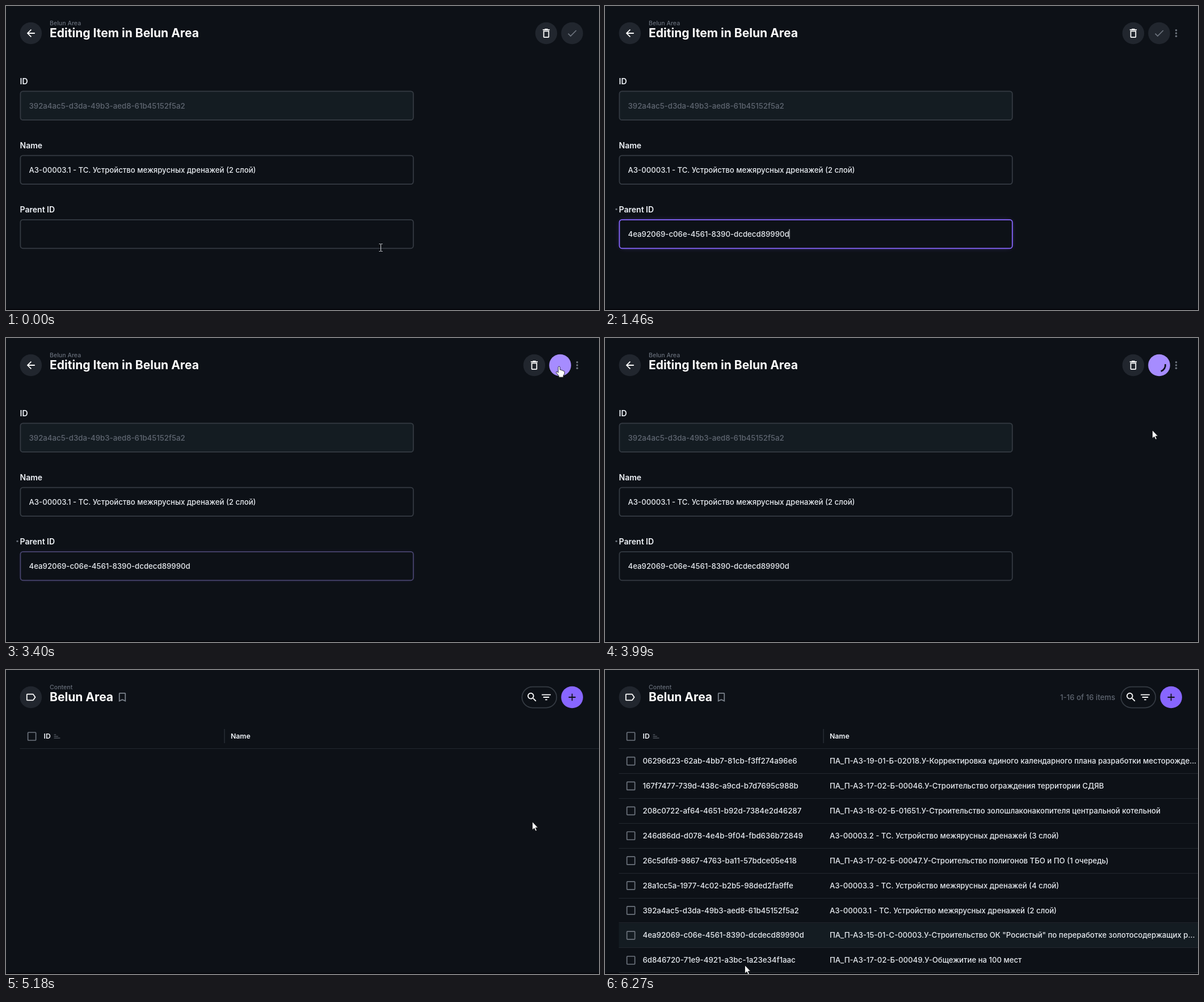
Recreate the animation shown at these times as an HTML page. Size 1045x536 px, loop 6300 ms.

```html
<!DOCTYPE html>
<html lang="en">
<head>
<meta charset="utf-8">
<title>Item editor</title>
<style>
html, body { margin: 0; width: 100%; height: 100%; overflow: hidden; background: #0d1117; }
svg { display: block; width: 1045px; height: 536px; font: 500 13.16px Inter, sans-serif; }
text { white-space: pre; }
.title { font-size: 21.06px; font-weight: 700; fill: #fff; }
.over { font-size: 10.6px; fill: #666d78; }
.label { font-size: 14.04px; font-weight: 600; fill: #f0f4f9; }
.head { font-size: 12.28px; font-weight: 600; fill: #f0f4f9; }
.body { fill: #e8ecf1; }
.id { font-size: 13.24px; }
.dim { fill: #5f6671; }
</style>
</head>
<body>
<svg id="stage" viewBox="0 0 1045 536" xmlns="http://www.w3.org/2000/svg"></svg>
<script>
const LOOP = 6300, SCALE = 0.8775, ROW = 43.9, TOP = 138.6;
const BG = '#0d1117', CHIP = '#21262e', LINE = '#353b43', RULE = '#23282f', SOFT = '#141c22', WHITE = '#fff';
const NAME = 'Belun Area';
const PARENT = '4ea92069-c06e-4561-8390-dcdecd89990d';

const icons = {
  back: 'M20 11H7.83l5.59-5.59L12 4l-8 8 8 8 1.41-1.41L7.83 13H20v-2z',
  bin: 'M6 19c0 1.1.9 2 2 2h8c1.1 0 2-.9 2-2V7H6v12zM8 9h8v10H8V9zm7.5-5l-1-1h-5l-1 1H5v2h14V4h-3.5z',
  check: 'M9 16.17L4.83 12l-1.42 1.41L9 19 21 7l-1.41-1.41L9 16.17z',
  tag: 'M17.63 5.84C17.27 5.33 16.67 5 16 5L5 5.01C3.9 5.01 3 5.9 3 7v10c0 1.1.9 1.99 2 1.99L16 19c.67 0 1.27-.33 1.63-.84L22 12l-4.37-6.16zM16 17H5V7h11l3.55 5L16 17z',
  mark: 'M17 3H7c-1.1 0-1.99.9-1.99 2L5 21l7-3 7 3V5c0-1.1-.9-2-2-2zm0 15l-5-2.18L7 18V5h10v13z',
  search: 'M15.5 14h-.79l-.28-.27C15.41 12.59 16 11.11 16 9.5 16 5.91 13.09 3 9.5 3S3 5.91 3 9.5 5.91 16 9.5 16c1.61 0 3.09-.59 4.23-1.57l.27.28v.79l5 4.99L20.49 19l-4.99-5zm-6 0C7.01 14 5 11.99 5 9.5S7.01 5 9.5 5 14 7.01 14 9.5 11.99 14 9.5 14z',
  filter: 'M10 18h4v-2h-4v2zM3 6v2h18V6H3zm3 7h12v-2H6v2z',
  add: 'M19 13h-6v6h-2v-6H5v-2h6V5h2v6h6v2z',
  sort: 'M3 6h6v2H3zM3 11h12v2H3zM3 16h18v2H3z'
};

const rows = [
  ['06296d23-62ab-4bb7-81cb-f3ff274a96e6', 'ПА_П-АЗ-19-01-Б-02018.У-Корректировка единого календарного плана разработки месторожде...'],
  ['167f7477-739d-438c-a9cd-b7d7695c988b', 'ПА_П-АЗ-17-02-Б-00046.У-Строительство ограждения территории СДЯВ'],
  ['208c0722-af64-4651-b92d-7384e2d46287', 'ПА_П-АЗ-18-02-Б-01651.У-Строительство золошлаконакопителя центральной котельной'],
  ['246d86dd-d078-4e4b-9f04-fbd636b72849', 'АЗ-00003.2 - ТС. Устройство межярусных дренажей (3 слой)'],
  ['26c5dfd9-9867-4763-ba11-57bdce05e418', 'ПА_П-АЗ-17-02-Б-00047.У-Строительство полигонов ТБО и ПО (1 очередь)'],
  ['28a1cc5a-1977-4c02-b2b5-98ded2fa9ffe', 'АЗ-00003.3 - ТС. Устройство межярусных дренажей (4 слой)'],
  ['392a4ac5-d3da-49b3-aed8-61b45152f5a2', 'АЗ-00003.1 - ТС. Устройство межярусных дренажей (2 слой)'],
  [PARENT, 'ПА_П-АЗ-15-01-С-00003.У-Строительство ОК "Росистый" по переработке золотосодержащих р...'],
  ['6d846720-71e9-4921-a3bc-1a23e34f1aac', 'ПА_П-АЗ-17-02-Б-00049.У-Общежитие на 100 мест']
];

// pointer track: time, x, y
const track = [
  [0, 660.5, 426], [30, 660.5, 426], [310, 664, 421.5], [600, 664, 421.5], [830, 690, 550],
  [2449, 690, 550], [2450, 690, 436], [2600, 890, 275], [2680, 905, 238], [2760, 919.5, 210.5],
  [2830, 935, 183], [2960, 968, 80], [3060, 975, 50], [3400, 975, 50], [3520, 990, 68],
  [3620, 999, 98], [3760, 985, 138], [3930, 964.5, 162.5], [4000, 964.5, 162.5], [4250, 951, 200],
  [4570, 927.5, 267.5], [5660, 927.5, 267.5], [6010, 903, 401], [6190, 903, 401],
  [6240, 480, 480], [6270, 246.5, 520.5], [6300, 246.5, 520.5]
];

const svg = (tag, attrs, inner = '') =>
  `<${tag} ${Object.entries(attrs).map(([k, v]) => `${k}="${v}"`).join(' ')}>${inner}</${tag}>`;
const text = (x, y, cls, str) => svg('text', { x, y, class: cls }, str);
const icon = (name, x, y, fill, s = SCALE, id = '') =>
  svg('path', { d: icons[name], fill, id, transform: `translate(${x} ${y}) scale(${s}) translate(-12 -12)` });
const disc = (x, y, fill, r = 19.3, id = '') => svg('circle', { cx: x, cy: y, r, fill, id });
const hline = y => svg('rect', { x: 24.5, y: Math.round(y - 0.5), width: 1020.5, height: 1, fill: RULE });
const box = (y, fill, id = '') => svg('rect', {
  x: 25.4, y: y + 0.9, width: 692.4, height: 50.5, rx: 4.5, fill, stroke: LINE, 'stroke-width': 1.75, id });
const tick = y => svg('rect', {
  x: 38.6, y: y - 7, width: 14, height: 14, rx: 1, fill: 'none', stroke: '#6c737d', 'stroke-width': 1.7 });

const dots = [-5.3, 0, 5.3].map(d => disc(1006.5, 48 + d, '#6c737d', 1.75)).join('');

const form =
  disc(43.8, 48, CHIP) + icon('back', 43.8, 48, WHITE) +
  text(77, 33.5, 'over', NAME) + text(77, 55.2, 'title', 'Editing Item in ' + NAME) +
  svg('g', { id: 'actions' },
    disc(952, 48, CHIP) + icon('bin', 952, 48, WHITE) +
    disc(997.6, 48, CHIP, 19.3, 'save') + icon('check', 997.6, 48, '#6c737d', SCALE, 'tick') +
    svg('path', { id: 'spin', fill: 'none', stroke: BG, 'stroke-width': 2.8 })) +
  svg('g', { id: 'edited' }, dots + disc(20, 358.3, '#6c737d', 1.6)) +
  text(24.5, 137.8, 'label', 'ID') + box(149.5, SOFT) +
  text(40.5, 180.7, 'dim id', rows[6][0]) +
  text(24.5, 250.9, 'label', 'Name') + box(262.7, BG) +
  text(40.5, 294, 'body', rows[6][1]) +
  text(24.5, 364, 'label', 'Parent ID') +
  svg('rect', { id: 'glow', x: 28, y: 379, width: 687, height: 46, rx: 5, fill: '#8866ff', filter: 'url(#soft)' }) +
  box(375.9, BG, 'field') +
  svg('g', { id: 'value' }, text(40.5, 407, 'body id', PARENT)) +
  svg('rect', { id: 'caret', y: 393.5, width: 1, height: 17, fill: '#e6e9ee' });

const list =
  disc(43.8, 48, CHIP) + icon('tag', 43.8, 48, WHITE) +
  text(77, 33.5, 'over', 'Content') + text(77, 55.2, 'title', NAME) +
  icon('mark', 205, 48, '#7b828c') +
  svg('g', { id: 'count' }, text(802, 52.6, 'dim id', '1-16 of 16 items')) +
  svg('rect', { x: 909.3, y: 29.6, width: 61, height: 37, rx: 18.5, fill: 'none', stroke: LINE, 'stroke-width': 1.75 }) +
  icon('search', 927, 48, WHITE) + icon('filter', 952, 48, WHITE) +
  disc(997.6, 48, '#8866ff') + icon('add', 997.6, 48, BG) +
  tick(117) + text(66.5, 121.3, 'head', 'ID') + icon('sort', 90, 117, '#6c737d', 0.6) +
  svg('rect', { x: 384.5, y: 104, width: 1, height: 25, fill: LINE }) +
  text(396, 121.3, 'head', 'Name') + hline(TOP) +
  svg('g', { id: 'rows' },
    svg('rect', { id: 'hover', x: 24.5, width: 1020.5, height: ROW - 1, fill: SOFT }) +
    rows.map(([id, name], i) => {
      const y = TOP + ROW * (i + 0.5);
      return tick(y) + text(66.5, y + 4.6, 'body id', id) + text(396, y + 4.6, 'body', name) + hline(TOP + ROW * (i + 1));
    }).join(''));

const edge = { stroke: '#05070a', 'stroke-width': 0.8, 'stroke-linejoin': 'round', fill: WHITE };
const pointer =
  svg('path', { id: 'arrow', d: 'M0 0V14.5L3.4 11.4 5.6 16.4 7.9 15.4 5.7 10.6H10Z', ...edge }) +
  svg('path', { id: 'hand', d: 'M-2 1.5Q-2 0-.5 0T1 1.5V6Q3.5 5 4 7 6 6 6.5 8 9 7.5 9 9.5V13L7 16V19H-1V16.5L-5.5 11Q-6 9-4 9L-2 11Z', ...edge }) +
  svg('path', { id: 'beam', d: 'M-3-6.5H-1L0-6 1-6.5H3M0-6V6M-3 6.5H-1L0 6 1 6.5H3', fill: 'none', stroke: '#d5d8dc', 'stroke-width': 1 });

document.getElementById('stage').innerHTML =
  '<defs><filter id="soft" x="-5%" y="-60%" width="110%" height="220%"><feGaussianBlur stdDeviation="5"/></filter></defs>' +
  svg('rect', { width: 1045, height: 536, fill: BG }) +
  svg('g', { id: 'form' }, form) + svg('g', { id: 'list' }, list) +
  svg('rect', { y: 534, width: 1045, height: 2, fill: '#05060b' }) +
  svg('g', { id: 'pointer' }, pointer);

const el = {};
document.querySelectorAll('svg [id]').forEach(n => { if (n.id) el[n.id] = n; });

const show = (id, on) => el[id].setAttribute('visibility', on ? 'inherit' : 'hidden');
const set = (id, attrs) => { for (const k in attrs) el[id].setAttribute(k, attrs[k]); };
const ramp = (t, a, b) => Math.min(1, Math.max(0, (t - a) / (b - a)));
const ease = k => (1 - Math.cos(Math.PI * k)) / 2;
const blend = (a, b, k) => a.map((v, i) => Math.round(v + (b[i] - v) * k));
const mix = (a, b, k) => `rgb(${blend(a, b, k)})`;

function place(t) {
  let i = 0;
  while (i < track.length - 2 && track[i + 1][0] <= t) i++;
  const [t0, x0, y0] = track[i], [t1, x1, y1] = track[i + 1];
  const k = ramp(t, t0, t1);
  return [x0 + (x1 - x0) * k, y0 + (y1 - y0) * k];
}

function arc(start, sweep) {
  const at = deg => {
    const a = (deg - 90) * Math.PI / 180;
    return `${(997.6 + 11 * Math.cos(a)).toFixed(2)} ${(48 + 11 * Math.sin(a)).toFixed(2)}`;
  };
  return `M${at(start)}A11 11 0 ${sweep > 180 ? 1 : 0} 1 ${at(start + sweep)}`;
}

function spinner(t) {
  const turn = 80 + (t - 3990) * 0.1347;
  const tail = 310 * ease(ramp(t, 4840, 6140));
  const head = 310 * ease(ramp(t, 3540, 4840));
  return arc(turn + tail, Math.max(0.1, head - tail));
}

function draw(t) {
  const onList = t >= 5180, filled = t >= 1460, busy = t >= 3400;
  const [x, y] = place(t);

  show('form', !onList);
  show('list', onList);

  if (!onList) {
    const focus = ramp(t, 470, 620) * (1 - ramp(t, 3310, 3430));
    const rest = blend([53, 59, 67], [72, 79, 88], ramp(t, 30, 150) * (1 - ramp(t, 700, 800)));
    set('field', { stroke: mix(rest, [136, 102, 255], focus) });
    set('glow', { opacity: 0.55 * focus });
    show('value', filled);
    show('edited', filled);
    set('actions', { transform: `translate(${filled ? -21.1 : 0} 0)` });

    const ready = ramp(t, 1470, 1590), hot = ramp(t, 2980, 3060);
    set('save', { fill: hot ? mix([136, 102, 255], [166, 140, 255], hot) : mix([33, 38, 46], [136, 102, 255], ready) });
    set('tick', { fill: mix([108, 115, 125], [13, 17, 23], ready) });
    show('tick', !busy);
    show('spin', t >= 3540);
    if (t >= 3540) set('spin', { d: spinner(t) });

    show('caret', [[500, 1020], [1460, 2000], [2530, 3060]].some(([a, b]) => t >= a && t < b));
    set('caret', { x: filled ? 324.5 : 40.5 });
  } else {
    set('count', { opacity: ramp(t, 5210, 5270) });
    show('rows', t >= 5460);
    // the row highlight trails the pointer by one tick
    const row = Math.floor((place(Math.floor(t / 30) * 30 - 30)[1] - TOP) / ROW);
    show('hover', t >= 5500);
    set('hover', { y: TOP + ROW * row + 0.5 });
  }

  const overField = !onList && x < 719 && y < 428 && y > 376;
  const overSave = !onList && Math.hypot(x - 976.5, y - 48) < 19.3;
  const hand = overSave || (t >= 5500 && t < 6240);
  show('pointer', t < 830 || t >= 2450);
  show('beam', overField);
  show('hand', hand);
  show('arrow', !overField && !hand);
  set('pointer', { transform: `translate(${x.toFixed(2)} ${y.toFixed(2)})` });
}

const begin = performance.now();
function frame() {
  draw((performance.now() - begin) % LOOP);
  requestAnimationFrame(frame);
}
draw(0);
requestAnimationFrame(frame);
</script>
</body>
</html>
```
